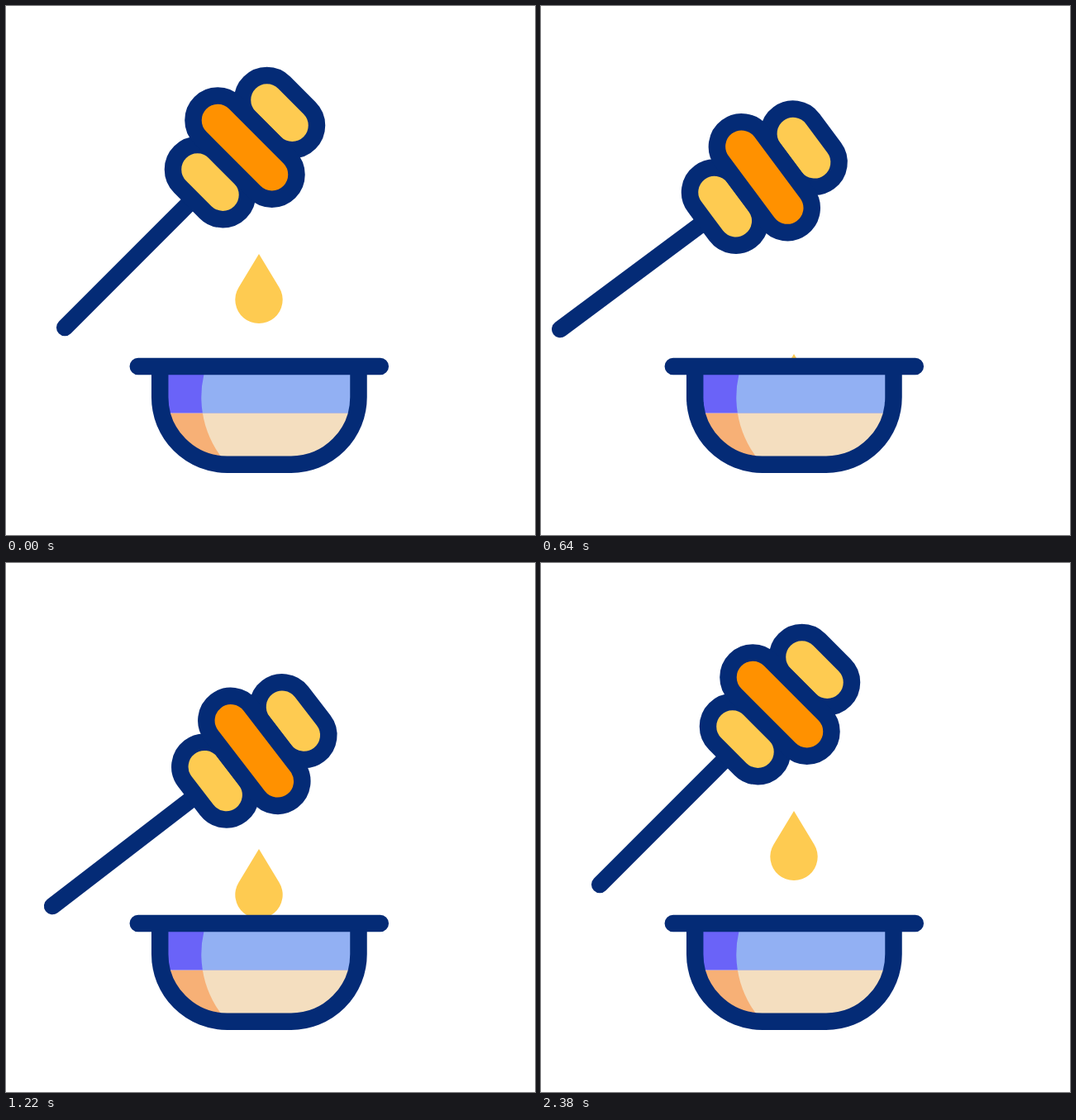
Write an HTML page that moves like this. It is 640 px wide and 640 px high and loops after 2.4 s.

```html
<!DOCTYPE html>
<html lang="en">
<head>
<meta charset="utf-8">
<title>Honey dipper</title>
<style>
  html, body { margin: 0; width: 100%; height: 100%; overflow: hidden; background: #fff; }
  svg { display: block; width: 100vw; height: 100vh; }
  .line { stroke: #042b76; stroke-width: 20.5; stroke-linecap: round; }
  .honey { fill: #fecb51; }
  .amber { fill: #ff9100; }
</style>
</head>
<body>
<svg viewBox="0 0 640 640" xmlns="http://www.w3.org/2000/svg">
  <defs>
    <clipPath id="above"><rect width="640" height="436"/></clipPath>
    <clipPath id="inside">
      <path d="M186.2 436V473.2A81.5 81.5 0 0 0 267.7 554.7H345A81.5 81.5 0 0 0 426.5 473.2V436Z"/>
    </clipPath>
    <clipPath id="lit"><path d="M239.4 446V436H440V560H273A121 121 0 0 1 239.4 446Z"/></clipPath>
  </defs>

  <g clip-path="url(#above)">
    <path id="drop" class="honey" d="M0 0L24.5 40.4A28.7 28.7 0 1 1 -24.5 40.4Z"/>
  </g>

  <g clip-path="url(#inside)">
    <rect x="180" y="430" width="260" height="62.7" fill="#6a63f8"/>
    <rect x="180" y="492.7" width="260" height="70" fill="#f7b076"/>
    <g clip-path="url(#lit)">
      <rect x="180" y="430" width="260" height="62.7" fill="#92b0f3"/>
      <rect x="180" y="492.7" width="260" height="70" fill="#f4debf"/>
    </g>
  </g>
  <path class="line" fill="none" d="M186.2 436V473.2A81.5 81.5 0 0 0 267.7 554.7H345A81.5 81.5 0 0 0 426.5 473.2V436M159.8 436H452.8"/>

  <g id="dipper">
    <path class="line" d="M-215.4 0H3.5"/>
    <rect class="line honey" x="3.5" y="-51.35" width="59.4" height="102.7" rx="29.7"/>
    <rect class="line honey" x="122.3" y="-51.35" width="59.4" height="102.7" rx="29.7"/>
    <rect class="line amber" x="62.9" y="-76.1" width="59.4" height="152.2" rx="29.7"/>
  </g>
</svg>
<script>
const LOOP = 2400;
const dipper = document.getElementById('dipper');
const drop = document.getElementById('drop');

// Ease with handles (a, 0) and (b, 1).
function ease(u, a = 0.333, b = 0.667) {
  if (u <= 0) return 0;
  if (u >= 1) return 1;
  let lo = 0, hi = 1;
  for (let i = 0; i < 30; i++) {
    const s = (lo + hi) / 2, r = 1 - s;
    if (3 * r * r * s * a + 3 * r * s * s * b + s * s * s < u) lo = s;
    else hi = s;
  }
  return lo * lo * (3 - 2 * lo);
}

// Each pose: time, x, y, turn, and the ease handles leading to the next pose.
const poses = [
  { t: 0, v: [0, 0, 0] },
  { t: 475, v: [-19.8, 59.3, 17.6] },
  { t: 800, v: [-34.8, -6.1, -0.5], h: [0.21, 0.667] },
  { t: 1220, v: [3.4, 47.2, 7.45], h: [0.333, 0.75] },
  { t: 1640, v: [0, 0, 0] }
];

function dipperPose(t) {
  const i = poses.findIndex(p => p.t > t);
  if (i < 0) return poses[poses.length - 1].v;
  const p = poses[i - 1], q = poses[i];
  const k = ease((t - p.t) / (q.t - p.t), ...(p.h || []));
  return p.v.map((n, j) => n + (q.v[j] - n) * k);
}

// Height of the drop's tip: two falls into the bowl, then a new drop settles.
function dropTop(t) {
  if (t < 710) return 300 + 121 * Math.pow(t / 640, 1.33);
  if (t < 1560) return 140 + 206 * Math.pow((t - 710) / 510, 0.748);
  return 140 + 160 * ease((t - 1600) / 560);
}

function draw(now) {
  const t = now % LOOP;
  const [x, y, turn] = dipperPose(t);
  dipper.setAttribute('transform', `translate(${223.5 + x} ${236.6 + y}) rotate(${turn - 45})`);
  drop.setAttribute('transform', `translate(306 ${dropTop(t)})`);
}

let start;
function tick(now) {
  if (start === undefined) start = now;
  draw(Math.max(0, now - start));
  requestAnimationFrame(tick);
}
draw(0);
requestAnimationFrame(tick);
</script>
</body>
</html>
```
